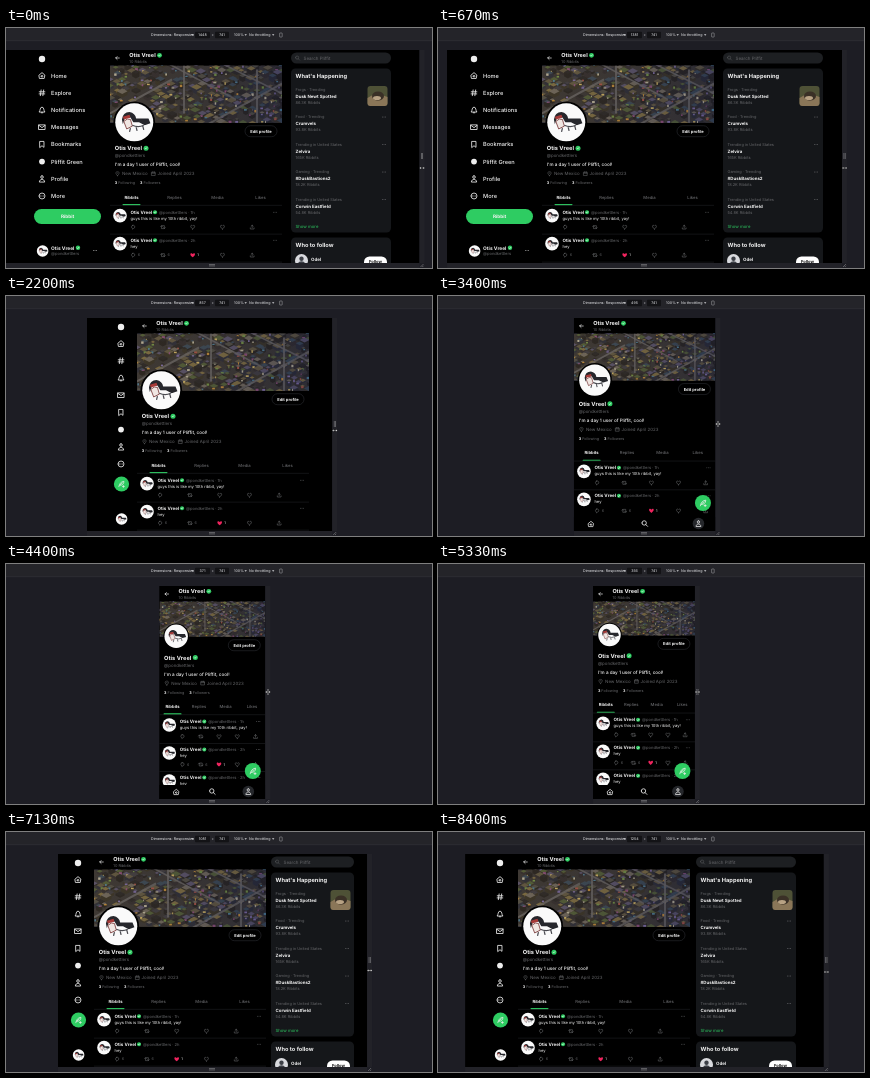
Write an HTML page that moves like this. It is 426 by 240 pixels and loops after 8470 ms.

```html
<!DOCTYPE html>
<html lang="en">
<head>
<meta charset="utf-8">
<title>Responsive profile page</title>
<style>
  html, body { margin: 0; width: 100%; height: 100%; overflow: hidden; background: #1d1d24; }
  #stage { display: block; width: 100vw; height: 100vh; }
  text { font-family: Inter, "Open Sans", sans-serif; fill: #f4f4f4; text-rendering: geometricPrecision; white-space: pre; }
  .b { font-weight: 700; }
  .m { font-weight: 500; }
  .g { fill: #66676a; }
  .green { fill: #2ecc62; }
  .dark { fill: #111; }
  .tool { fill: #d2d3d6; }
  .c { text-anchor: middle; }
  .ic { fill: none; stroke: #f0f0f0; stroke-width: .75; stroke-linejoin: round; stroke-linecap: round; }
  .dim { stroke: #66676a; stroke-width: .55; }
  .line { stroke: #24262a; stroke-width: .5; }
</style>
</head>
<body>
<svg id="stage" viewBox="0 0 426 240" preserveAspectRatio="none"></svg>
<script>
const LOOP = 8470, STEP = 200 / 3, SCALE = 0.286, COL = 172;

// time, device width, device centre
const DRAG = [
  [0, 414, 206.5], [350, 412, 206.5], [1330, 359.3, 206.5], [2200, 245.2, 203.6],
  [3400, 141.5, 206.7], [4400, 106, 206.3], [5330, 101.5, 206], [6200, 188, 206.3],
  [7130, 309, 206.5], [8200, 358, 206.5], [8400, 358.7, 206.5], [8470, 358.7, 206.5]
];

// smallest page width, main column, nav icons, side column, side width
const LAYOUTS = [
  [1265, 104, 36, 285, 100], [1255, 80, 59, 261, 100], [1095, 80, 62, 258, 100],
  [1005, 88, 72, 265, 83], [500, 131, 115, 0, 0]
];

const ICONS = {
  home: "M-2.6-.5L0-2.7L2.6-.5L2 2.6H-2ZM-.8.6a.8.8 0 1 0 1.6 0a.8.8 0 1 0-1.6 0",
  hash: "M-.8-2.6L-1.5 2.6M1.5-2.6L.8 2.6M-2.5-.9H2.6M-2.6 1H2.5",
  bell: "M-2.4 1.6C-1.4.6-2-2.6 0-2.6S1.4.6 2.4 1.6ZM-.7 2.5H.7",
  mail: "M-2.8-2.1H2.8V2.1H-2.8ZM-2.8-1.7L0 .4L2.8-1.7",
  mark: "M-1.8-2.7H1.8V2.7L0 1.2L-1.8 2.7Z",
  user: "M-2.4 2.6C-2.2-.3 2.2-.3 2.4 2.6ZM0-2.8a1.2 1.2 0 1 1 0 2.4a1.2 1.2 0 1 1 0-2.4",
  more: "M-2.7 0a2.7 2.7 0 1 0 5.4 0a2.7 2.7 0 1 0-5.4 0M-1.2 0h.01M0 0h.01M1.2 0h.01",
  find: "M-2.5-.5a2 2 0 1 0 4 0a2 2 0 1 0-4 0M1 1L2.6 2.6",
  back: "M2 0H-2M-.4-1.6L-2 0L-.4 1.6",
  quill: "M-2.6 2.8C-2-.8 0-2.6 2.8-2.8C2.8.2.8 1.6-1.6 1.4M-1.2.8L1.2-1.2M1.2 2.6H3.2M2.2 1.6V3.6",
  reply: "M-.4-1.7H.4A1.5 1.5 0 0 1 .4 1.2L-.6 2V1.2A1.5 1.5 0 0 1-.4-1.7Z",
  again: "M-2.2-.5L-1.4-1.4L-.6-.5M-1.4-1.3V1.4H.6M2.2.5L1.4 1.4L.6.5M1.4 1.3V-1.4H-.6",
  heart: "M0 1.8C-3.6-.5-1.5-3 0-1C1.5-3 3.6-.5 0 1.8Z",
  share: "M0 .7V-1.8M-1-.9L0-1.8L1-.9M-1.8.7V1.8H1.8V.7",
  pin: "M0 2C-3-1 -1.4-2 0-2S3-1 0 2ZM0-.7v.2",
  date: "M-1.7-1.5H1.7V1.8H-1.7ZM-1.7-.5H1.7M-.8-2v.7M.8-2v.7"
};

const NAME = "Otis Vreel", HANDLE = "@pondkettlers", SITE = "Pliffit";

const text = (x, y, size, str, cls = "") =>
  `<text x="${x}" y="${y + size * .36}" font-size="${size}" class="${cls}">${str}</text>`;
const icon = (name, x, y, cls = "", s = 1) =>
  `<path class="ic ${cls}" d="${ICONS[name]}" transform="translate(${x} ${y}) scale(${s})"/>`;
const rect = (x, y, w, h, fill, r = 0, more = "") =>
  `<rect x="${x}" y="${y}" width="${w}" height="${h}" rx="${r}" fill="${fill}" ${more}/>`;
const disc = (x, y, r, fill, more = "") => `<circle cx="${x}" cy="${y}" r="${r}" fill="${fill}" ${more}/>`;
const face = (x, y, r) => `<use href="#face" transform="translate(${x} ${y}) scale(${r / 20})"/>`;
const badge = (x, y, r = 2.2) => disc(x, y, r, "#2ecc62") +
  `<path d="M-1 0L-.2.8L1.1-.8" fill="none" stroke="#fff" stroke-width=".6" transform="translate(${x} ${y})"/>`;
const dots = (x, y, fill = "#77787b") => [-1.6, 0, 1.6].map(d => disc(x + d, y, .45, fill)).join("");
const group = (id, body) => `<g id="${id}">${body}</g>`;

function random(seed) {
  return () => (seed = (seed * 16807) % 2147483647) / 2147483647;
}

// Crowded isometric town: streets first, then blocks with lit sides and small details
function banner() {
  const rnd = random(90210), pick = list => list[Math.floor(rnd() * list.length)];
  const roofs = ["#5d5444", "#3a3844", "#7a6a45", "#4c4a48", "#565070", "#4d5a3a", "#242228", "#6b6460", "#35455a"];
  const walls = ["#211e22", "#2d2830", "#332e28", "#26283a"];
  const accents = ["#c08a3c", "#7d6cb0", "#a8504a", "#6f9048", "#b9b2a0", "#4a7c9c", "#d0b468", "#8a4a80"];
  let out = rect(0, 0, COL, 57.4, "#343136");
  for (let row = 0; row < 18; row++)
    for (let col = 0; col < 19; col++) {
      const x = col * 10 + (row % 2) * 5 + rnd() * 3, y = row * 3.7, s = 2 + rnd() * 3.5, h = 1 + rnd() * 4;
      if (rnd() < .15) continue;
      out += `<path fill="${pick(walls)}" d="M${x - s} ${y - h}v${h}l${s} ${s / 2}l${s} ${-s / 2}v${-h}z"/>` +
        `<path fill="${pick(roofs)}" d="M${x - s} ${y - h}l${s} ${-s / 2}l${s} ${s / 2}l${-s} ${s / 2}z"/>`;
      if (rnd() < .55) out += rect(x - s + rnd() * s, y - h + rnd() * 3, 1 + rnd() * 2, 1 + rnd() * 1.6, pick(accents));
    }
  const street = (d, w) => `<path d="${d}" fill="none" stroke="#68666c" stroke-width="${w}" opacity=".8"/>`;
  out += street("M-4 50L62 14M92 62L176 16", 2) + street("M58-2L126 34M112-2L176 30", 1.6) + street("M74 0V48M147 4V58", 2);
  return `<svg width="${COL}" height="57.4">${out}${rect(0, 0, COL, 57.4, "url(#shade)")}</svg>`;
}

function post(i, body, age, counts) {
  const y = 184 + i * 28;
  const acts = ["reply", "again", "heart", "heart", "share"].map((name, k) => {
    const hot = counts && k === 2;
    const mark = hot
      ? `<path d="${ICONS.heart}" fill="#f0245e" transform="translate(0 ${y + 15}) scale(1.15)"/>`
      : icon(name, 0, y + 15, "dim", 1.05);
    const num = counts && counts[k] ? text(4.5, y + 15, 3.6, counts[k], hot ? "" : "g") : "";
    return `<g class="act" data-k="${k}">${mark}${num}</g>`;
  }).join("");
  return face(10, y + 3.5, 6.8) + text(20.5, y, 4.5, NAME, "b") + badge(45, y, 2) +
    text(49, y, 4.1, `${HANDLE} · ${age}`, "g") + `<g class="end">${dots(-7, y)}</g>` +
    text(20.5, y + 6, 4.1, body) + acts +
    `<line class="line" x1="0" x2="${COL}" y1="${y + 22}" y2="${y + 22}"/>`;
}

function mainColumn() {
  const tabs = ["Ribbits", "Replies", "Media", "Likes"].map((label, i) =>
    `<g class="tab" data-k="${i}">${text(0, 169, 4.2, label, i ? "c g m" : "c b")}` +
    (i ? "" : rect(-9, 175.8, 18, 1.2, "#2ecc62", .6)) + "</g>").join("");
  return icon("back", 7.5, 30, "", .9) + text(19.3, 27.5, 5.5, NAME, "b") + badge(49.5, 27.3, 2.4) +
    text(19.3, 33.8, 3.9, "10 Ribbits", "g") +
    group("banner", banner()) +
    group("edit", rect(-16, -5.5, 32, 11, "#000", 5.5, 'stroke="#33353a" stroke-width=".5"') +
      text(0, 0, 4.1, "Edit profile", "b c")) +
    group("avatar", disc(0, 0, 20.8, "#000") + face(0, 0, 19)) +
    group("body",
      text(4.8, 120, 5.7, NAME, "b") + badge(36, 120, 2.5) +
      text(4.8, 127.6, 4.4, HANDLE, "g") +
      text(4.8, 136.4, 4.6, `I'm a day 1 user of ${SITE}, cool!`, "m") +
      icon("pin", 7.5, 145.6, "dim") + text(12, 145.6, 4.4, "New Mexico", "g") +
      icon("date", 43.5, 145.6, "dim") + text(47.5, 145.6, 4.4, "Joined April 2023", "g") +
      text(4.8, 155, 3.75, '<tspan class="b">3</tspan> <tspan class="g">Following</tspan>') +
      text(30, 155, 3.75, '<tspan class="b">3</tspan> <tspan class="g">Followers</tspan>') +
      tabs + `<line class="line" x1="0" x2="${COL}" y1="177.2" y2="177.2"/>` +
      post(0, "guys this is like my 10th ribbit, yay!", "1h") +
      post(1, "hey", "2h", ["6", "6", "1"]) +
      post(2, "hey", "2h", ["1", "", "1"]));
}

function navColumn() {
  const items = [["home", "Home"], ["hash", "Explore"], ["bell", "Notifications"], ["mail", "Messages"],
    ["mark", "Bookmarks"], ["", SITE + " Green"], ["user", "Profile"], ["more", "More"]];
  const rows = items.map(([name], i) => {
    const y = 47.6 + i * 17.2;
    return name ? icon(name, 0, y, "", 1.1) : disc(0, y, 2.9, "#eee");
  }).join("");
  const labels = items.map(([, label], i) => text(9, 47.6 + i * 17.2, 5.65, label, "m")).join("");
  return disc(0, 31, 3.2, "#eee") + rows + face(.6, 223, 5.8) +
    group("wide", labels + rect(-8, 181, 67, 15, "#2ecc62", 7.5) + text(25.5, 188.4, 4.7, "Ribbit", "b c") +
      text(9, 219.8, 4.9, NAME, "b") + badge(36, 219.8, 2.2) + text(9, 226, 4.1, HANDLE, "g") + dots(53, 222.5, "#ddd")) +
    group("slim", disc(.5, 188, 7.6, "#2ecc62") + icon("quill", .3, 188, "", .95));
}

function sideColumn() {
  const trends = [["Frogs · Trending", "Dusk Newt Spotted", "86.3K"], ["Food · Trending", "Crumvels", "93.8K"],
    ["Trending in United States", "Zelvira", "165K"], ["Gaming · Trending", "#DuskBastions2", "18.2K"],
    ["Trending in United States", "Corwin Eastfield", "54.8K"]];
  const list = trends.map(([kind, title, count], i) => {
    const y = 61.5 + i * 27.5;
    return text(4.5, y, 3.9, kind, "g") + text(4.5, y + 6.5, 4.4, title, "b") +
      text(4.5, y + 13, 4, count + " Ribbits", "g") + (i ? `<g class="far">${dots(-7, y)}</g>` : "");
  }).join("");
  const thumb = rect(-23.5, 58, 20, 20, "#4e5136", 3) +
    '<path d="M-23.5 70L-15 65L-3.5 69V75Q-3.5 78-6.5 78H-20.5Q-23.5 78-23.5 75Z" fill="#8a7658"/>' +
    '<ellipse cx="-13" cy="68" rx="6" ry="4.5" fill="#3a3026"/><ellipse cx="-14" cy="70" rx="4" ry="2" fill="#b8a284"/>';
  return rect(0, 24.5, 100, 11, "#1d1f22", 5.5, 'class="panel"') + icon("find", 6.5, 30, "dim", .8) +
    text(12.5, 30, 4.5, "Search " + SITE, "g") +
    rect(0, 40.5, 100, 164, "#15171a", 4.5, 'class="panel"') + text(4.5, 48, 5.7, "What's Happening", "b") +
    list + `<g class="far">${thumb}</g>` + text(4.5, 198.5, 4.3, "Show more", "green") +
    rect(0, 209.5, 100, 50, "#15171a", 4.5, 'class="panel"') + text(4.5, 217, 5.7, "Who to follow", "b") +
    disc(10.5, 232.5, 6.5, "#d9dade") + disc(10.5, 230.8, 2.2, "#3c3f46") + disc(10.5, 237, 3.8, "#3c3f46") +
    text(20, 231, 4.5, "Odel", "b") +
    `<g class="far">${rect(-27, 228.5, 23, 11, "#fff", 5.5)}${text(-15.5, 234, 4.1, "Follow", "b c dark")}</g>`;
}

const phoneBar = rect(-80, 221, 160, 14, "#000") +
  `<g id="p0">${icon("home", 0, 228)}</g>` + icon("find", 0, 227.5, "", 1.1) +
  `<g id="p2">${disc(0, 227.5, 5.8, "#25272b")}${icon("user", 0, 227.5)}</g>`;

const caret = x => `<path class="tool" d="M${x} 6.2h2.4l-1.2 1.6z"/>`;
const toolbar = rect(0, 0, 426, 12.5, "#242429") + rect(0, 12.5, 426, .6, "#34343b") +
  text(145, 7, 3.7, "Dimensions: Responsive", "tool m") + caret(185) +
  rect(189, 3.7, 15, 6.6, "#131316", 1) + `<text id="size" x="196.5" y="8.2" font-size="3.6" class="c tool m"></text>` +
  text(206.5, 7, 3.4, "×", "c tool") + rect(209, 3.7, 14, 6.6, "#131316", 1) + text(216, 7, 3.6, "741", "c tool m") +
  text(228, 7, 3.6, "100%", "tool m") + caret(238.5) + text(243, 7, 3.6, "No throttling", "tool m") + caret(266) +
  rect(273.6, 5, 2.6, 4, "none", .4, 'stroke="#a9aaad" stroke-width=".5"');

const handles = rect(0, 22, 5, 213, "#222228") + rect(1.7, 125, .5, 6, "#9a9a9d") + rect(2.9, 125, .5, 6, "#9a9a9d") +
  '<path d="M1 239L4 236M2.8 239L4 237.8" stroke="#9a9a9d" stroke-width=".5"/>';
const arrow = "M-2.6 0L-1.1-1.3V-.35H1.1V-1.3L2.6 0L1.1 1.3V.35H-1.1V1.3Z";

const stage = document.getElementById("stage");
stage.innerHTML = `<defs>
  <clipPath id="clip"><rect id="screen" y="22" height="213"/></clipPath>
  <clipPath id="colClip"><rect id="colBox" y="22" height="213"/></clipPath>
  <linearGradient id="shade"><stop offset="0" stop-color="#776325" stop-opacity=".15"/>
    <stop offset="1" stop-color="#1c2030" stop-opacity=".3"/></linearGradient>
  <g id="face">${disc(0, 0, 20, "#fafafa")}
    <path d="M-13-3Q-12-11-5-11Q1-10 2-4L15-4L17 1L11 3L5 0L-1 0L-4-5L-10-4L-12 2Z" fill="#26272c"/>
    <path d="M-11-1Q-7-5-4-3L-2 4L-8 7Z" fill="#f0e6e2" stroke="#7a3a3a" stroke-width=".9"/>
    <path d="M-12-6L-5-8L-4-5L-11-3Z" fill="#a83a38"/>
    <path d="M-2 3Q4 6 10 3M-4 6L-5 10M2 5L3 9M9 4L10 8" fill="none" stroke="#4a4a50" stroke-width="1.3"/></g></defs>
  ${rect(0, 0, 426, 240, "#1d1d24")}${toolbar}
  ${rect(0, 235, 1, 5, "#222228", 0, 'id="foot"')}
  ${rect(203, 236.4, 6, .5, "#9a9a9d")}${rect(203, 237.7, 6, .5, "#9a9a9d")}
  <g clip-path="url(#clip)">${rect(0, 22, 426, 213, "#000")}
    ${group("nav", navColumn())}
    <g id="main"><g clip-path="url(#colClip)">${mainColumn()}</g></g>
    ${group("side", sideColumn())}
    ${group("fab", disc(0, 207, 8, "#2ecc62") + icon("quill", 0, 207))}
    ${group("phone", phoneBar)}</g>
  ${group("handles", handles)}
  <path id="cursor" d="${arrow}" fill="#fff" stroke="#000" stroke-width=".3"/>`;

const el = id => document.getElementById(id);
const all = sel => [...stage.querySelectorAll(sel)];
const ends = all(".end"), tabs = all(".tab"), acts = all(".act"), fars = all(".far"), panels = all(".panel");
const move = (node, x, y = 0, s = 1) => node.setAttribute("transform", `translate(${x} ${y}) scale(${s})`);
const show = (id, on) => el(id).setAttribute("display", on ? "inline" : "none");
const span = (id, x, w) => { el(id).setAttribute("x", x); el(id).setAttribute("width", w); };

function sample(t) {
  const i = Math.max(1, DRAG.findIndex(k => k[0] >= t));
  const a = DRAG[i - 1], b = DRAG[i], f = (t - a[0]) / (b[0] - a[0]);
  return [1, 2].map(k => a[k] + (b[k] - a[k]) * f);
}

function draw(t) {
  const [width, mid] = sample(t);
  const left = mid - width / 2, right = mid + width / 2, page = Math.round(width / SCALE);
  const layout = LAYOUTS.find(row => page >= row[0]);
  const phone = !layout;
  let x = left, w = width;
  if (layout) {
    const snug = page < 696;
    x = snug ? left + 24 : layout[1];
    w = Math.min(COL, right - x);
    move(el("nav"), snug ? x - 16 : layout[2]);
    show("wide", page >= 1265);
    show("slim", page < 1265);
    move(el("side"), layout[3]);
    panels.forEach(n => n.setAttribute("width", layout[4]));
    fars.forEach(n => move(n, layout[4]));
  }
  show("nav", !phone);
  show("side", layout && layout[3]);
  show("fab", phone);
  show("phone", phone);

  span("screen", left, width);
  span("colBox", 0, w);
  span("foot", left, width);
  move(el("main"), x);
  const edge = 37.5 + w / 3;
  move(el("banner"), 0, 37.5, w / COL);
  move(el("avatar"), 5 + w * .112, edge - .5, w / COL);
  move(el("edit"), w - 21, edge + 8.4);
  move(el("body"), 0, edge + 20.4 + (w - 102) * .07 - 120);
  ends.forEach(n => move(n, w));
  tabs.forEach(n => move(n, (+n.dataset.k + .5) * w / 4));
  const gap = Math.min(w - 33, 119) / 4;
  acts.forEach(n => move(n, 23.2 + n.dataset.k * gap));

  move(el("fab"), right - 12.5);
  move(el("phone"), mid);
  move(el("p0"), 17 - width / 2);
  move(el("p2"), width / 2 - 17);
  move(el("handles"), right);
  move(el("cursor"), right + 2.6, 128 + 12 * Math.min(1, Math.max(0, (width - 142) / 190)));
  el("size").textContent = page;
}

const start = performance.now();
function tick() {
  const t = (performance.now() - start) % LOOP;
  draw(Math.floor((t + 4) / STEP) * STEP);
  requestAnimationFrame(tick);
}
tick();
</script>
</body>
</html>
```
